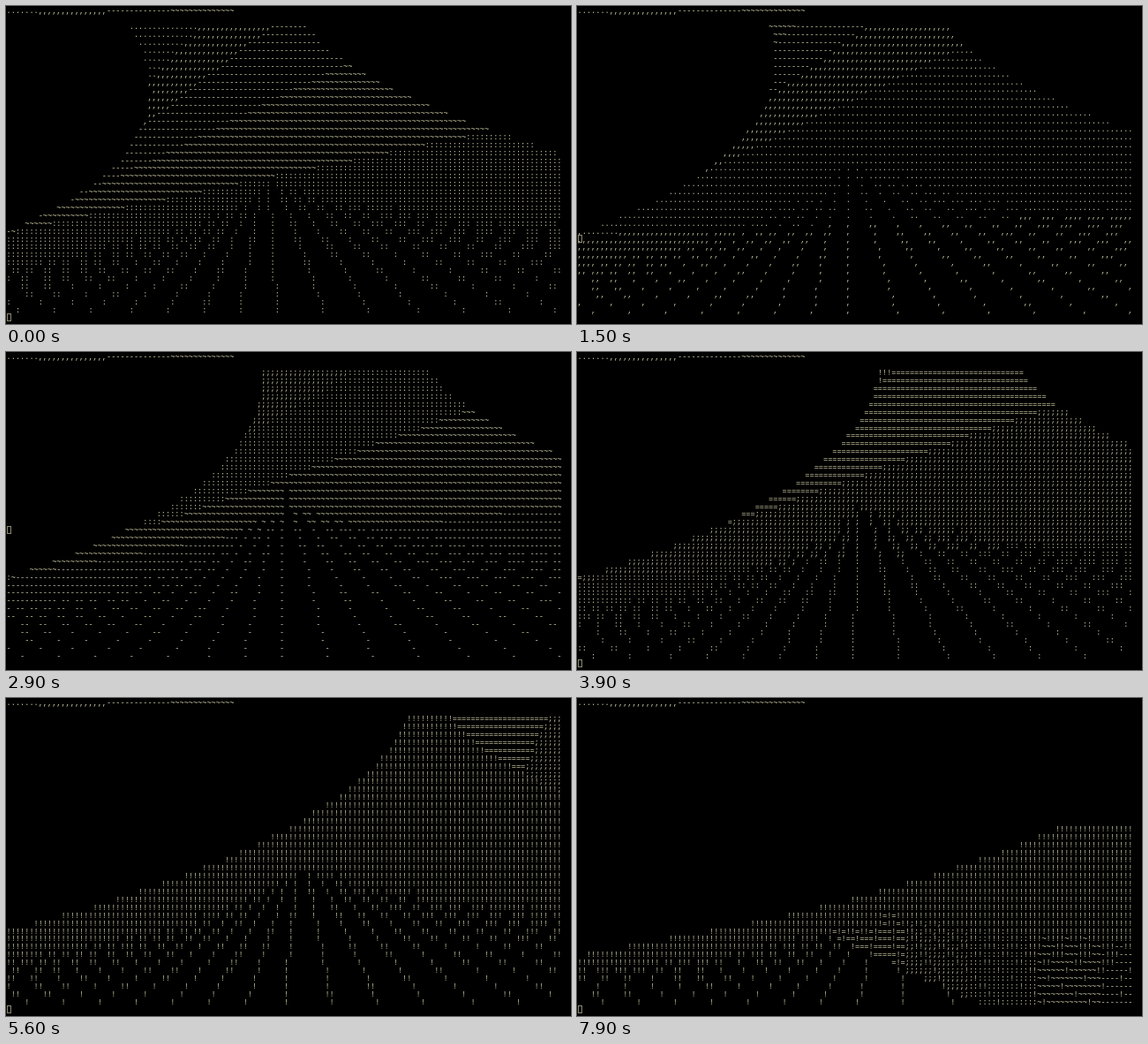
An HTML page with a canvas that plays this animation: 640 by 360 pixels, repeating every 8 s.

```html
<!DOCTYPE html>
<html>
<head>
<meta charset="utf-8">
<style>
html, body { margin: 0; width: 100%; height: 100%; overflow: hidden; background: #000; }
canvas { display: block; }
</style>
</head>
<body>
<canvas id="stage" width="640" height="360"></canvas>
<script>
const ctx = document.getElementById('stage').getContext('2d');
const RAMP = '.,-~:;=!';
const HEADER = '.'.repeat(7) + ','.repeat(15) + '-'.repeat(14) + '~'.repeat(14);
const CW = 5.155, RH = 8.9, COLS = 122, LAST = 39;
const INK = '#cccaa6', CURSOR = '#8c8a70';

// Upper left outline: rises from the left margin and leans right with time.
function leftEdge(t, y) {
  const u = (258 - y) / 234;
  const bent = Math.max(0, u) ** 1.5;
  const base = -8 + 195 * (Math.max(0, t - 4.2) / 3.7) ** 2;
  const bulge = 740 + 62 * t, reach = 152 + 51 * t;
  return base + bulge * (u - bent) + reach * bent;
}

// Upper right outline of the near face.
function rightEdge(t, y) {
  const w = (y - 24) / 144;
  return 340 + 170 * Math.sin(0.33 * t) + 110 * w + 180 * w * w;
}

const crest = t => 20 + 88 * Math.max(0, t - 6.5);

// Light turning towards the surface; its strength depends on the slope to the left margin.
function nearShade(t, x, y) {
  const turn = Math.min(Math.PI / 2, 0.35 * (t - 1.95));
  const slope = Math.max(0, (257 - y) / x);
  const light = 7.5 * Math.sin(turn) + 4.5 * Math.cos(turn) * slope;
  return RAMP[Math.min(7, Math.floor(Math.abs(light)))];
}

// Ray number at a point: whole numbers lie on a ray. Null where rays are packed solid.
function ray(t, x, y) {
  const h = 130 + 3.7 * (t - 3) ** 2;
  const vanish = 295 + 7 * t, foot = 307 + 1.5 * t;
  const d = x - (vanish + (foot - vanish) * (y - h) / (345 - h));
  const horizon = d < 0 ? h + (190 - 0.7 * h) * Math.min(1, -d / 300) : h;
  const depth = (y - horizon) / (345 - horizon);
  return depth < 0.02 ? null : d / ((d < 0 ? 42 : 53) * depth);
}

// A cell is filled when a ray passes through it; distant cells catch more of a ray.
function covered(t, x, y) {
  const reach = RH / 2 * Math.max(0, (345 - y) / 190);
  const corners = [];
  for (const dx of [-CW / 2, CW / 2])
    for (const dy of [-reach, reach]) {
      const r = ray(t, x + dx, y + dy);
      if (r === null) return true;
      corners.push(Math.floor(r));
    }
  return Math.min(...corners) !== Math.max(...corners);
}

function farShade(x, y, left) {
  if (x - left < 16) return '!';
  return x < 613 - (y - 24) * 0.45 ? '=' : ';';
}

// Inner face seen between the rays, sliding in from the right.
function innerShade(t, x, y) {
  const px = x - (7.9 - t) * 300;
  const inside = px > 280 && y > 237 - (px - 330) * 0.14 && px > 320 + (y - 285) * 2.3;
  return t > 6.8 && inside ? RAMP[6 - Math.max(0, Math.floor((px - 300) / 73))] : null;
}

function glyph(t, x, y) {
  const left = leftEdge(t, y), right = rightEdge(t, y);
  if (y < crest(t) || x < left - CW / 2) return null;
  if (x > right + CW / 2 && y < 250) {
    const farWidth = 250 * (t - 4.9);
    return x < right + farWidth ? farShade(x, y, left) : null;
  }
  return covered(t, x, y) ? nearShade(t, x, y) : innerShade(t, x, y);
}

function put(ch, col, row) {
  ctx.fillText(ch, 0.6 + col * CW, 8.4 + row * RH);
}

// Every 14th step the redraw is caught partway, seven rows higher each time.
const stopRow = step => step % 14 === 1 ? 36 - (step - 1) / 2 : LAST;

function draw(step) {
  const stop = stopRow(step);
  ctx.fillStyle = '#000';
  ctx.fillRect(0, 0, 640, 360);
  ctx.font = '8.6px "Liberation Mono", monospace';
  ctx.fillStyle = INK;
  [...HEADER].forEach((ch, col) => put(ch, col, 0));
  for (let row = 2; row < LAST; row++) {
    const t = (row < stop ? step : step - 1) / 10;
    for (let col = 0; col < COLS; col++) {
      const ch = glyph(t, 3.2 + col * CW, 6 + row * RH);
      if (ch) put(ch, col, row);
    }
  }
  ctx.strokeStyle = CURSOR;
  ctx.strokeRect(1.5, Math.round(1 + stop * RH) + 0.5, 4, 8);
}

const start = performance.now();
let shown = -1;
function tick() {
  const step = Math.floor(((performance.now() - start) % 8000) / 100);
  if (step !== shown) draw(shown = step);
  requestAnimationFrame(tick);
}
tick();
</script>
</body>
</html>
```
